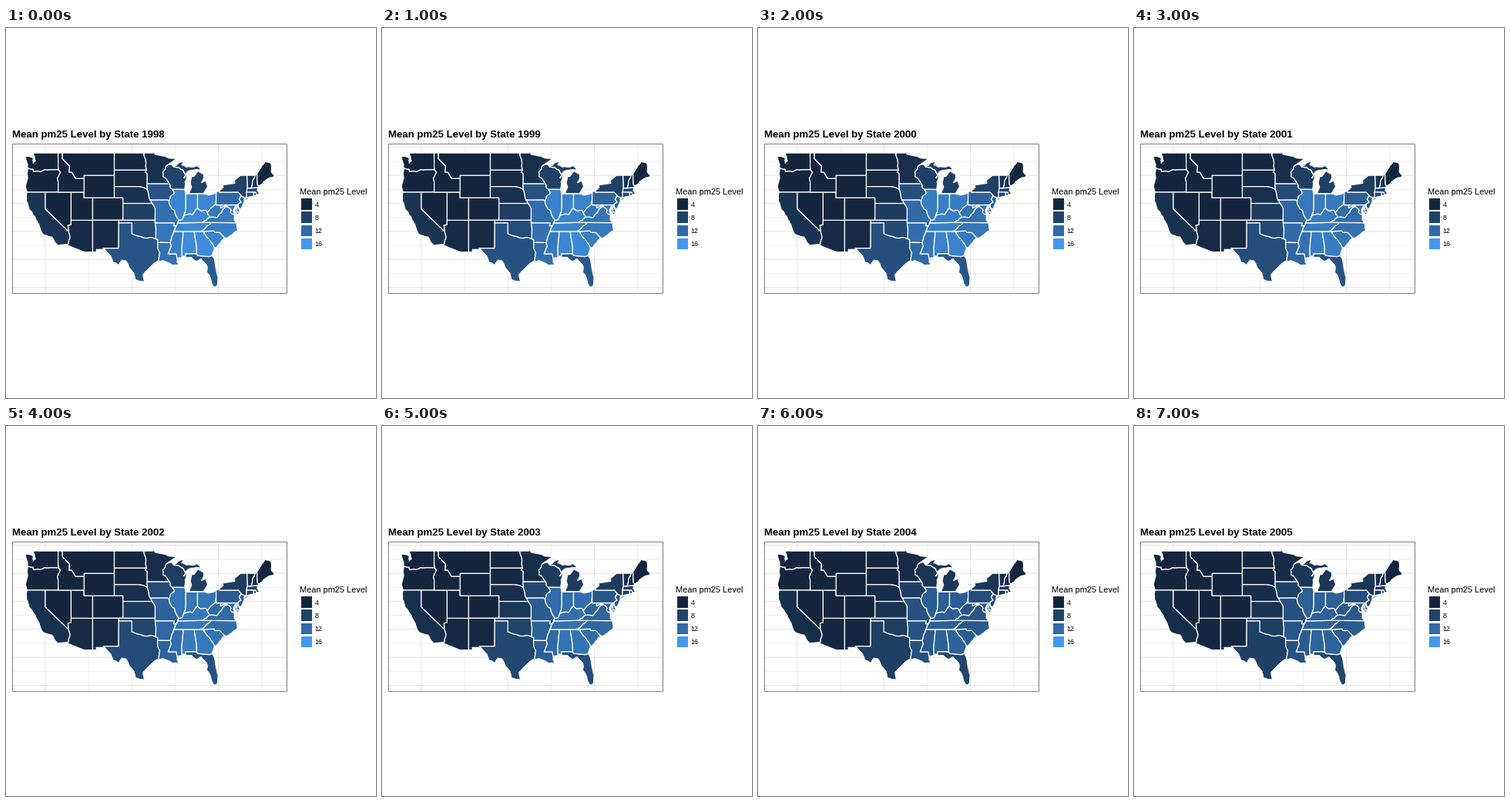
These frames come from a looping animation (480 px wide and 480 px high, 8 s). A matplotlib script:

```python
import numpy as np
import matplotlib.pyplot as plt
from matplotlib.animation import FuncAnimation
from matplotlib.patches import Polygon, Rectangle

PX = 0.9  # points per pixel at 80 dpi
YEARS = 8
FONT = "Liberation Sans"
CLEAN = 3.6  # level that stays put while higher ones fall
LOW, HIGH = np.array([20, 38, 62]), np.array([67, 152, 237])

rng = np.random.default_rng(4)
fig = plt.figure(figsize=(6, 6), dpi=80, facecolor="white")
ax = fig.add_axes([0, 0, 1, 1])
ax.set_xlim(0, 480)
ax.set_ylim(480, 0)
ax.axis("off")

arcs = {}
states = []


def to_px(lon, lat):
    """West longitude and north latitude to stage pixels."""
    return 51 + (120 - lon) * 5.613, 162.1 + (49 - lat) * 7.272


def shade(level):
    """Fill colour for a pm25 level; 4 is the low end, 16 the high one."""
    t = np.clip((level - 4) / 12, 0, 1) ** 1.25
    return (LOW + (HIGH - LOW) * t) / 255


def level_in(year, first):
    """Levels shrink towards CLEAN, with a sharp drop before the last year."""
    done = np.interp(year, [0, 4, 5, 6, 7], [0, 0.45, 0.62, 1.05, 1])
    return first - 0.32 * done * (first - CLEAN)


def line(name, *coords):
    arcs[name] = np.reshape(coords, (-1, 2))


def rough(name, *coords):
    """A coast or river: key points with randomly displaced midpoints."""
    pts = np.reshape(coords, (-1, 2)).astype(float)
    for _ in range(2):
        step = np.diff(pts, axis=0)
        shift = rng.uniform(-0.1, 0.1, (len(step), 1))
        mids = pts[:-1] + step / 2 + step[:, ::-1] * [1, -1] * shift
        pts = np.insert(pts, np.arange(1, len(pts)), mids, axis=0)
    arcs[name] = pts


def dist(a, b):
    return np.hypot(*(a - b))


def gap(point, part):
    return min(dist(point, part[0]), dist(point, part[-1]))


def ring(names):
    """Join border arcs end to end, turning each one to fit."""
    parts = [arcs[n] for n in names.split()]
    path = parts[0]
    if len(parts) > 1 and gap(path[0], parts[1]) < gap(path[-1], parts[1]):
        path = path[::-1]
    for part in parts[1:]:
        if dist(part[-1], path[-1]) < dist(part[0], path[-1]):
            part = part[::-1]
        path = np.vstack([path, part])
    return path


def state(names, first):
    patch = Polygon(np.column_stack(to_px(*ring(names).T)), closed=True, ec="white",
                    lw=1.25 * PX, joinstyle="round", snap=False, zorder=2)
    ax.add_patch(patch)
    states.append((patch, first))


def label(x, y, text, size, **kw):
    return ax.text(x, y, text, fontsize=size * PX, family=FONT,
                   ha="left", va="baseline", **kw)


# West
rough("wa_coast", 124.03, 46.27, 124.1, 47, 124.7, 48.3, 122.75, 48.13, 122.8, 47.2,
      122.3, 47.6, 122.76, 49)
line("wa_id", 117.03, 49, 117.04, 46.43, 116.92, 46)
rough("wa_or", 124.03, 46.27, 122.9, 46.1, 122.75, 45.65, 121.2, 45.65, 119, 46)
line("or_id", 116.92, 46, 116.5, 45.55, 117.2, 44.45, 117.03, 43.8, 117.03, 42)
rough("or_coast", 124.21, 42, 124.55, 42.84, 124.08, 44.6, 124.03, 46.27)
rough("ca_coast", 124.21, 42, 124.4, 40.43, 123.7, 38.9, 122.5, 37.7, 121.85, 36.7,
      120.6, 34.5, 118.5, 34.02, 117.13, 32.53)
line("ca_nv", 120, 42, 120, 39, 114.63, 35)
rough("ca_az", 114.63, 35, 114.3, 34.2, 114.6, 33.2, 114.72, 32.72)
line("nv_az", 114.63, 35, 114.75, 36.1, 114.05, 36.2, 114.04, 37)
line("nv_ut", 114.04, 37, 114.04, 42)
line("az_south", 114.72, 32.72, 114.82, 32.5, 111.07, 31.33, 109.05, 31.33)
line("az_nm", 109.05, 31.33, 109.05, 37)
line("ut", 114.04, 42, 111.05, 42, 111.05, 41, 109.05, 41, 109.05, 37, 114.04, 37)
line("co", 109.05, 41, 102.05, 41, 102.05, 37, 109.05, 37)
line("wy", 111.05, 45, 104.05, 45, 104.05, 41, 111.05, 41)
line("nm", 109.05, 37, 103, 37, 103.06, 32, 106.62, 32, 106.53, 31.78,
     108.2, 31.78, 108.2, 31.33, 109.05, 31.33)
line("id_south", 117.03, 42, 111.05, 42, 111.05, 44.48)
line("id_mt", 111.05, 44.48, 113, 44.45, 113.9, 45.6, 114.5, 45.56, 114.4, 46.65,
     116.05, 48, 116.05, 49)
line("mt_box", 116.05, 49, 104.05, 49, 104.05, 45, 111.05, 45, 111.05, 44.48)

# Plains
rough("red", 97.23, 49, 96.8, 46.6, 96.56, 45.94)
line("nd_box", 96.56, 45.94, 104.05, 45.94, 104.05, 49, 97.23, 49)
line("sd_mn", 96.56, 45.94, 96.85, 45.6, 96.45, 45.3, 96.45, 43.5)
rough("sd_ia", 96.45, 43.5, 96.45, 42.49)
line("sd_ne", 96.45, 42.49, 97.3, 42.85, 98.5, 43, 104.05, 43)
line("sd_west", 104.05, 43, 104.05, 45.94)
rough("ne_ia", 96.45, 42.49, 95.77, 40.59)
rough("ne_mo", 95.77, 40.59, 95.3, 40)
line("ne_box", 95.3, 40, 102.05, 40, 102.05, 41, 104.05, 41)
line("ks_mo", 95.3, 40, 94.95, 39.6, 94.61, 39.11, 94.62, 37)
line("ks_box", 94.62, 37, 102.05, 37, 102.05, 40)
line("ok_ar", 94.62, 36.5, 94.43, 35.4, 94.48, 33.64)
rough("red_river", 94.48, 33.64, 95.5, 33.9, 97, 33.8, 98.2, 34.1, 100, 34.56)
line("ok_box", 100, 34.56, 100, 36.5, 103.04, 36.5, 103, 37, 94.62, 37)
line("tx_box", 100, 34.56, 100, 36.5, 103.04, 36.5, 103.06, 32, 106.62, 32)
rough("rio", 106.62, 32, 104.9, 30.6, 104.4, 29.55, 103.1, 28.98, 102.3, 29.88,
      101.4, 29.77, 99.5, 27.5, 99.2, 26.4, 97.15, 25.95)
rough("tx_coast", 97.15, 25.95, 97.4, 27.3, 95.1, 29.1, 93.85, 29.7)
line("tx_la", 93.85, 29.7, 93.55, 31.2, 94.04, 32, 94.04, 33.02)
line("tx_ar", 94.04, 33.02, 94.04, 33.55, 94.48, 33.64)

# Great Lakes and Mississippi
line("mn_north", 97.23, 49, 95.15, 49, 95.15, 49.38, 94.6, 48.75, 92.3, 48.4,
     91.4, 48.07, 89.6, 48, 92.05, 46.7)
rough("mn_wi", 92.05, 46.7, 92.3, 46.1, 92.85, 45.6, 92.75, 44.75, 91.22, 43.5)
rough("ia_wi", 91.22, 43.5, 91.15, 42.9, 90.64, 42.51)
rough("ia_il", 90.64, 42.51, 90.2, 41.8, 91.1, 41.2, 91.42, 40.38)
line("ia_mo", 95.77, 40.59, 91.73, 40.61, 91.42, 40.38)
rough("wi_sup", 92.05, 46.7, 90.8, 46.95, 90.42, 46.57)
rough("wi_mi", 90.42, 46.57, 88.1, 45.9, 87.6, 45.1)
rough("wi_lake", 87.6, 45.1, 88, 44.55, 87.1, 45.25, 87.7, 43.8, 87.8, 42.49)
rough("up_shore", 90.42, 46.57, 87.8, 47.45, 88.45, 46.85, 87.4, 46.5, 85, 46.75,
      84, 46, 86.3, 45.9, 87, 45.75, 87.6, 45.1)
line("mi_low", 84.75, 45.78, 85.6, 44.85, 86.2, 44.75, 86.5, 43.6, 86.2, 42.9,
     86.82, 41.76, 83.45, 41.73, 82.45, 43, 82.95, 44.07, 83.9, 43.7, 83.35, 44.5, 83.4, 45.2)
line("il_lake", 87.8, 42.49, 87.53, 41.7)
line("il_in", 87.53, 41.7, 87.53, 39.35, 87.6, 38.6, 88.05, 37.8)
rough("il_ky", 88.05, 37.8, 88.45, 37.1, 89.15, 37)
rough("il_mo", 91.42, 40.38, 90.7, 39, 90.15, 38.7, 89.5, 37.35, 89.15, 37)
line("in_oh", 84.81, 41.7, 84.82, 39.1)
rough("in_ky", 88.05, 37.8, 86, 38, 85.4, 38.7, 84.82, 39.1)
rough("oh_lake", 83.45, 41.73, 82.4, 41.45, 80.52, 41.98)
line("oh_pa", 80.52, 41.98, 80.52, 40.64)
rough("oh_wv", 80.52, 40.64, 80.85, 39.7, 82, 38.9, 82.6, 38.42)
rough("oh_ky", 82.6, 38.42, 82.9, 38.75, 83.8, 38.7, 84.82, 39.1)

# South
rough("ky_wv", 82.6, 38.42, 81.97, 37.54)
rough("ky_va", 81.97, 37.54, 83.68, 36.6)
line("ky_tn", 83.68, 36.6, 89.42, 36.5)
rough("ky_mo", 89.15, 37, 89.42, 36.5)
rough("tn_mo", 89.42, 36.5, 89.7, 36)
rough("tn_ar", 89.7, 36, 90.3, 35)
rough("tn_nc", 81.68, 36.59, 82.6, 36, 84.32, 34.99)
line("mo_ar", 94.62, 36.5, 90.15, 36.5, 90.37, 36, 89.7, 36)
rough("ar_ms", 90.3, 35, 91.15, 33)
line("la_ms", 91.15, 33, 90.9, 32.4, 91.6, 31, 89.73, 31, 89.53, 30.2)
rough("la_coast", 89.53, 30.2, 89.5, 29.5, 89.1, 29.1, 90.8, 29.05, 91.8, 29.5, 93.85, 29.7)
line("ms_al", 88.4, 30.35, 88.47, 31.9, 88.1, 34.9, 88.2, 35)
line("al_coast", 88.4, 30.35, 88, 30.65, 87.52, 30.28)
line("al_fl", 87.52, 30.28, 87.6, 31, 85, 31)
line("al_ga", 85, 31, 85.05, 32.3, 85.6, 34.99)
line("fl_ga", 85, 31, 84.86, 30.7, 82.1, 30.5, 81.45, 30.71)
rough("fl_coast", 81.45, 30.71, 80.55, 28.3, 80.05, 26.9, 80.35, 25.2, 81.1, 25.13,
      82.7, 27.7, 82.65, 28.9, 84, 30.1, 85.3, 29.68, 86.3, 30.38, 87.52, 30.28)
rough("ga_sc", 80.88, 32.03, 82, 33.5, 83.35, 34.7, 83.1, 35)
rough("sc_coast", 80.88, 32.03, 79.4, 33.05, 78.55, 33.86)
line("sc_nc", 78.55, 33.86, 79.67, 34.8, 80.8, 34.82, 81.05, 35.1, 83.1, 35)
rough("nc_coast", 78.55, 33.86, 77.9, 33.9, 76.55, 34.65, 75.55, 35.25, 75.87, 36.55)

# East
rough("va_wv", 81.97, 37.54, 80.3, 37.5, 78.35, 39.4, 77.72, 39.32)
rough("va_md", 77.72, 39.32, 77.05, 38.85, 77.2, 38.4, 76.32, 38)
rough("va_coast", 76.32, 38, 76.3, 37, 75.87, 36.55)
line("va_shore", 75.95, 37.15, 75.65, 37.95, 75.25, 38.03)
line("md_wv", 79.48, 39.72, 79.48, 39.2, 78.2, 39.65, 77.72, 39.32)
line("md_de", 75.79, 39.72, 75.7, 38.46, 75.05, 38.45)
rough("md_bay", 75.05, 38.45, 75.65, 37.95, 76.2, 38.6, 76.1, 39.45, 76.5, 38.9, 76.32, 38)
rough("de_bay", 75.05, 38.45, 75.5, 39.4, 75.42, 39.8)
line("wv_pa", 80.52, 40.64, 80.52, 39.72, 79.48, 39.72)
line("pa_de", 75.79, 39.72, 75.42, 39.8)
rough("pa_nj", 75.42, 39.8, 74.75, 40.2, 75.2, 40.75, 74.7, 41.36)
line("ny_pa", 74.7, 41.36, 75.35, 42, 79.76, 42, 79.76, 42.27)
rough("nj_coast", 75.42, 39.8, 75.4, 39.35, 74.9, 38.95, 74, 40.3, 74.02, 40.65)
line("ny_nj", 74.02, 40.65, 73.9, 41, 74.7, 41.36)
line("ny_north", 73.35, 45.01, 74.9, 45, 76.3, 44.1, 76.2, 43.6, 79.05, 43.27,
     78.9, 42.85, 79.76, 42.27)
line("long_island", 74, 40.6, 73.7, 40.87, 72, 41.05, 73.5, 40.6)
line("ny_vt", 73.35, 45.01, 73.27, 42.75)
line("ny_ma", 73.27, 42.75, 73.5, 42.05)
line("ny_ct", 73.5, 42.05, 73.5, 41.3, 73.65, 41)
line("ct_ri", 71.8, 42.02, 71.85, 41.32)
line("ri_ma", 71.8, 42.02, 71.38, 42.02, 71.15, 41.5)
line("ma_north", 73.27, 42.75, 72.46, 42.73, 70.82, 42.87)
rough("ma_coast", 70.82, 42.87, 71, 42.3, 70.5, 41.78, 70, 42.05, 69.95, 41.7, 71.15, 41.5)
rough("vt_nh", 71.5, 45.01, 72.05, 44.1, 72.46, 42.73)
line("nh_me", 71.08, 45.3, 70.98, 43.4, 70.7, 43.07)
line("nh_coast", 70.7, 43.07, 70.82, 42.87)
rough("me_coast", 71.08, 45.3, 70, 46.7, 69.23, 47.46, 68.3, 47.36, 67.8, 47.07,
      67.8, 45.7, 67, 44.85, 69.1, 44.1, 70.7, 43.07)

# Border arcs of each state with its first level
state("wa_coast wa_id wa_or", 3.9)
state("wa_or or_id or_coast", 3.9)
state("ca_coast ca_az ca_nv", 6.3)
state("ca_nv nv_az nv_ut", 3.6)
state("nv_az ca_az az_south az_nm", 5)
state("ut", 3.8)
state("co", 4.2)
state("wy", 3.6)
state("nm", 5)
state("wa_id or_id id_south id_mt", 3.8)
state("id_mt mt_box", 3.8)
state("red nd_box", 4.5)
state("sd_mn sd_ia sd_ne sd_west", 4.9)
state("sd_ne ne_ia ne_mo ne_box", 6)
state("ks_mo ks_box", 7.5)
state("ok_ar red_river ok_box", 9.2)
state("red_river tx_box rio tx_coast tx_la tx_ar", 9.8)
state("mn_north mn_wi sd_mn red", 5.8)
state("sd_ia ne_ia ia_mo ia_il ia_wi", 9.8)
state("ne_mo ks_mo mo_ar tn_mo ky_mo il_mo ia_mo", 12.5)
state("mo_ar tn_ar ar_ms tx_ar ok_ar", 13)
state("tx_la la_ms la_coast", 12.6)
state("ar_ms la_ms ms_al", 13.7)
state("ms_al al_coast al_fl al_ga", 15)
state("al_fl fl_ga fl_coast", 10.5)
state("al_ga fl_ga ga_sc", 15)
state("ga_sc sc_nc sc_coast", 14.2)
state("tn_nc sc_nc nc_coast", 13.7)
state("ky_tn tn_mo tn_ar tn_nc", 14.7)
state("ky_va ky_wv oh_ky in_ky il_ky ky_mo ky_tn", 14.7)
state("ky_va va_wv va_md va_coast", 13.3)
state("va_shore", 13.3)
state("ky_wv oh_wv wv_pa md_wv va_wv", 13.3)
state("va_md md_wv md_de md_bay", 12.8)
state("md_de de_bay pa_de", 12.5)
state("mn_wi wi_sup wi_mi wi_lake ia_wi", 8)
state("wi_mi up_shore", 8)
state("mi_low", 8)
state("ia_il il_mo il_ky il_in il_lake", 14.4)
state("il_in in_ky in_oh", 14.6)
state("in_oh oh_ky oh_wv oh_pa oh_lake", 14.5)
state("oh_pa wv_pa pa_de pa_nj ny_pa", 11.8)
state("pa_nj nj_coast ny_nj", 11.4)
state("ny_pa ny_nj ny_ct ny_ma ny_vt ny_north", 8)
state("long_island", 8)
state("ny_ct ct_ri", 9.5)
state("ct_ri ri_ma", 8.6)
state("ny_ma ma_north ma_coast ri_ma", 8.6)
state("ny_vt vt_nh", 6.2)
state("vt_nh nh_me nh_coast", 6)
state("nh_me me_coast", 4.2)

# Panel grid and border
LEFT, TOP, RIGHT, BOTTOM = 8, 150, 364, 344


def grid_line(k, xs, ys):
    ax.plot(xs, ys, color="#e8e8e8", lw=(0.6 if k % 2 else 1.1) * PX, snap=False, zorder=1)


for k in range(6):
    x = to_px(120 - 10 * k, 0)[0]
    grid_line(k, [x, x], [TOP, BOTTOM])
for k in range(11):
    y = to_px(0, 50 - 2.5 * k)[1]
    grid_line(k, [LEFT, RIGHT], [y, y])
ax.add_patch(Rectangle((LEFT, TOP), RIGHT - LEFT, BOTTOM - TOP, fc="none",
                       ec="#7f7f7f", lw=PX, zorder=3))

# Legend
label(381, 216, "Mean pm25 Level", 11)
for k in range(4):
    mid = 228.4 + 17.28 * k
    level = 4 * (k + 1)
    ax.add_patch(Rectangle((383, mid - 7.2), 14.4, 14.4, fc=shade(level), ec="none"))
    label(400.4, mid + 3.2, str(level), 8.8)

title = label(8, 142, "", 13.2, weight="bold")


def update(i):
    for patch, first in states:
        patch.set_facecolor(shade(level_in(i, first)))
    title.set_text(f"Mean pm25 Level by State {1998 + i}")
    return [title] + [patch for patch, _ in states]


anim = FuncAnimation(fig, update, frames=YEARS, interval=1000, repeat=True,
                     repeat_delay=0, blit=False)
plt.show()
```
